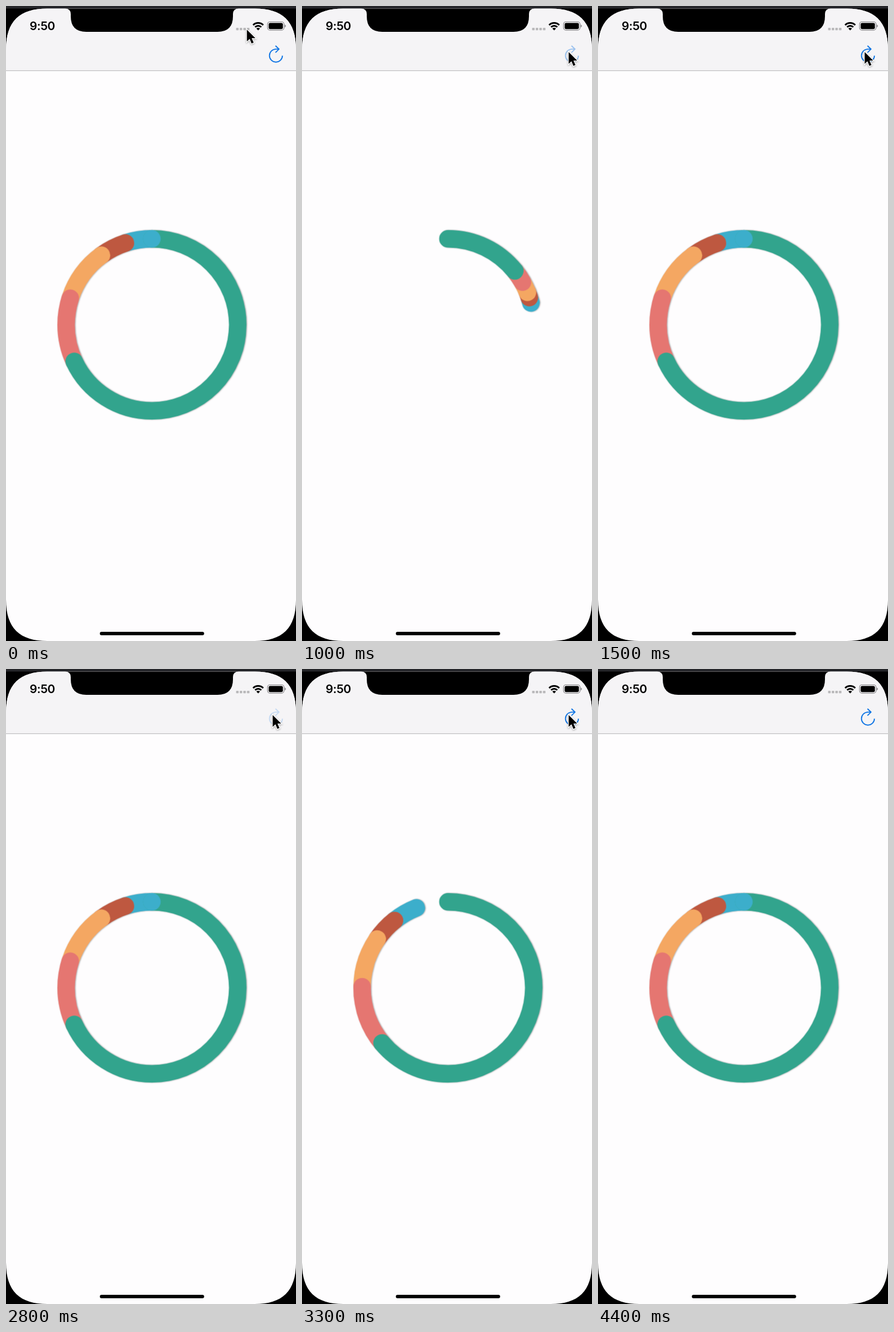
Animation, 506 px wide and 1106 px high, one loop 4.5 s. Source, as an HTML page:

```html
<!DOCTYPE html>
<html lang="en">
<head>
<meta charset="utf-8">
<title>Ring chart</title>
<style>
  html, body { margin: 0; width: 100%; height: 100%; overflow: hidden; background: #000; }
  svg { display: block; width: 100%; height: 100%; }
  .time { font: 600 20.5px Inter, "Liberation Sans", sans-serif; letter-spacing: -.4px; }
  #ring { fill: none; stroke-width: 30.6; stroke-linecap: round; filter: drop-shadow(0 1.6px 1.2px rgba(0, 0, 0, .36)); }
  #reload { fill: none; stroke: #1276e4; stroke-width: 1.9; }
  #cursor { filter: drop-shadow(0 1.5px 1.5px rgba(0, 0, 0, .35)); }
</style>
</head>
<body>
<svg viewBox="0 0 506 1106">
  <defs>
    <clipPath id="screen">
      <path d="M0 76C0 26 24 4.5 72 4.5H434C482 4.5 506 26 506 76V1034C506 1084 482 1106 434 1106H72C24 1106 0 1084 0 1034Z"/>
    </clipPath>
  </defs>
  <rect width="506" height="1106"/>
  <rect width="506" height="4.5" fill="#242529"/>
  <g clip-path="url(#screen)">
    <rect width="506" height="1106" fill="#fefdfe"/>
    <rect width="506" height="113" fill="#f5f4f6"/>
    <rect y="112" width="506" height="1.2" fill="#bfbec1"/>
  </g>
  <path d="M103 4.5Q113 4.5 113 14V18Q113 45 140 45H369Q396 45 396 18V14Q396 4.5 406 4.5Z"/>

  <text class="time" x="41.3" y="42.3">9:50</text>
  <g fill="#b9b8ba">
    <rect x="401.5" y="38" width="4.4" height="4.2" rx=".8"/>
    <rect x="407.8" y="38" width="4.4" height="4.2" rx=".8"/>
    <rect x="414.1" y="38" width="4.4" height="4.2" rx=".8"/>
    <rect x="420.4" y="38" width="4.4" height="4.2" rx=".8"/>
  </g>
  <g fill="none" stroke="#000" stroke-width="3">
    <path d="M431.2 33.2A12.4 12.4 0 0 1 448.8 33.2"/>
    <path d="M434.6 36.8A7.6 7.6 0 0 1 445.4 36.8"/>
  </g>
  <path d="M436.8 39.2A4.6 4.6 0 0 1 443.2 39.2L440 42.5Z"/>
  <rect x="456.3" y="27.5" width="28.8" height="14.6" rx="4.3" fill="none" stroke="#89888b" stroke-width="1.2"/>
  <rect x="458.3" y="29.4" width="24.8" height="10.8" rx="2.6"/>
  <path d="M486.4 32.2Q488.4 33 488.4 34.8T486.4 37.4Z" fill="#89888b"/>

  <g id="reload">
    <path d="M482.3 86.4A11.3 11.3 0 1 1 471 75.1H476.2M470.2 69.2L476.3 75.1L470.2 81.2"/>
  </g>
  <g id="ring" transform="translate(254.6 555.3) rotate(-90)"></g>
  <rect x="163.7" y="1090" width="182" height="6" rx="3"/>
  <path id="cursor" d="M0 0V20.5L4.8 16L8.2 24L11.8 22.5L8.4 14.7H14.8Z" stroke="#fff" stroke-width="2.6" paint-order="stroke"/>
</svg>
<script>
  const LOOP = 4500, STEP = 100, RADIUS = 149.8;
  const SLICES = [
    { from: 0, to: .68, color: '#32a48d' },
    { from: .68, to: .8, color: '#e57671' },
    { from: .8, to: .9, color: '#f4a762' },
    { from: .9, to: .95, color: '#be5840' },
    { from: .95, to: 1, color: '#3caecb' }
  ];
  const TAPS = [{ down: 800, up: 934 }, { down: 2750, up: 2898 }];
  const FILL = 500, FADE = 430, MOVE = 550, LEAVE = 4300;

  const byId = id => document.getElementById(id);
  const ring = byId('ring'), reload = byId('reload'), cursor = byId('cursor');
  const clamp = x => Math.min(1, Math.max(0, x));
  const smooth = x => x * x * (3 - 2 * x);

  // cubic-bezier(0, 0, .58, 1)
  function easeOut(x) {
    x = clamp(x);
    let lo = 0, hi = 1;
    for (let i = 0; i < 24; i++) {
      const s = (lo + hi) / 2;
      if (1.74 * (1 - s) * s * s + s * s * s < x) lo = s; else hi = s;
    }
    return smooth(hi);
  }

  function addCircle(color) {
    const c = document.createElementNS('http://www.w3.org/2000/svg', 'circle');
    c.setAttribute('r', RADIUS);
    c.setAttribute('pathLength', 1);
    c.setAttribute('stroke', color);
    return ring.appendChild(c);
  }

  function setArc(circle, from, to) {
    circle.setAttribute('stroke-dasharray', `${Math.max(to - from, .0001)} 2`);
    circle.setAttribute('stroke-dashoffset', -from);
  }

  // Earlier slices lie above later ones; the cap closes the ring over the first.
  const arcs = SLICES.slice().reverse().map(s => ({ ...s, el: addCircle(s.color) }));
  const cap = addCircle(SLICES[4].color);
  cap.removeAttribute('pathLength');
  cap.setAttribute('r', 15.3);
  cap.setAttribute('stroke', 'none');
  cap.setAttribute('fill', SLICES[4].color);

  function draw(t) {
    const tap = TAPS.filter(p => t >= p.down).pop();
    const run = TAPS.filter(p => t >= p.up).pop();

    const p = run ? easeOut((t - run.up) / FILL) : 1;
    for (const a of arcs) setArc(a.el, a.from * p, a.to * p);
    const angle = 2 * Math.PI * p;
    cap.setAttribute('cx', RADIUS * Math.cos(angle));
    cap.setAttribute('cy', RADIUS * Math.sin(angle));
    cap.setAttribute('visibility', p > .95 ? 'visible' : 'hidden');

    reload.setAttribute('opacity', tap ? .2 + .8 * easeOut((t - tap.up) / FADE) : 1);

    const m = smooth(clamp(t / MOVE));
    cursor.setAttribute('transform', `translate(${420.3 + 45 * m} ${41.3 + 39 * m})`);
    cursor.setAttribute('visibility', t < LEAVE ? 'visible' : 'hidden');
  }

  const start = performance.now();
  function tick() {
    const t = (performance.now() - start + 15) % LOOP;
    draw(Math.floor(t / STEP) * STEP);
    requestAnimationFrame(tick);
  }
  tick();
</script>
</body>
</html>
```
